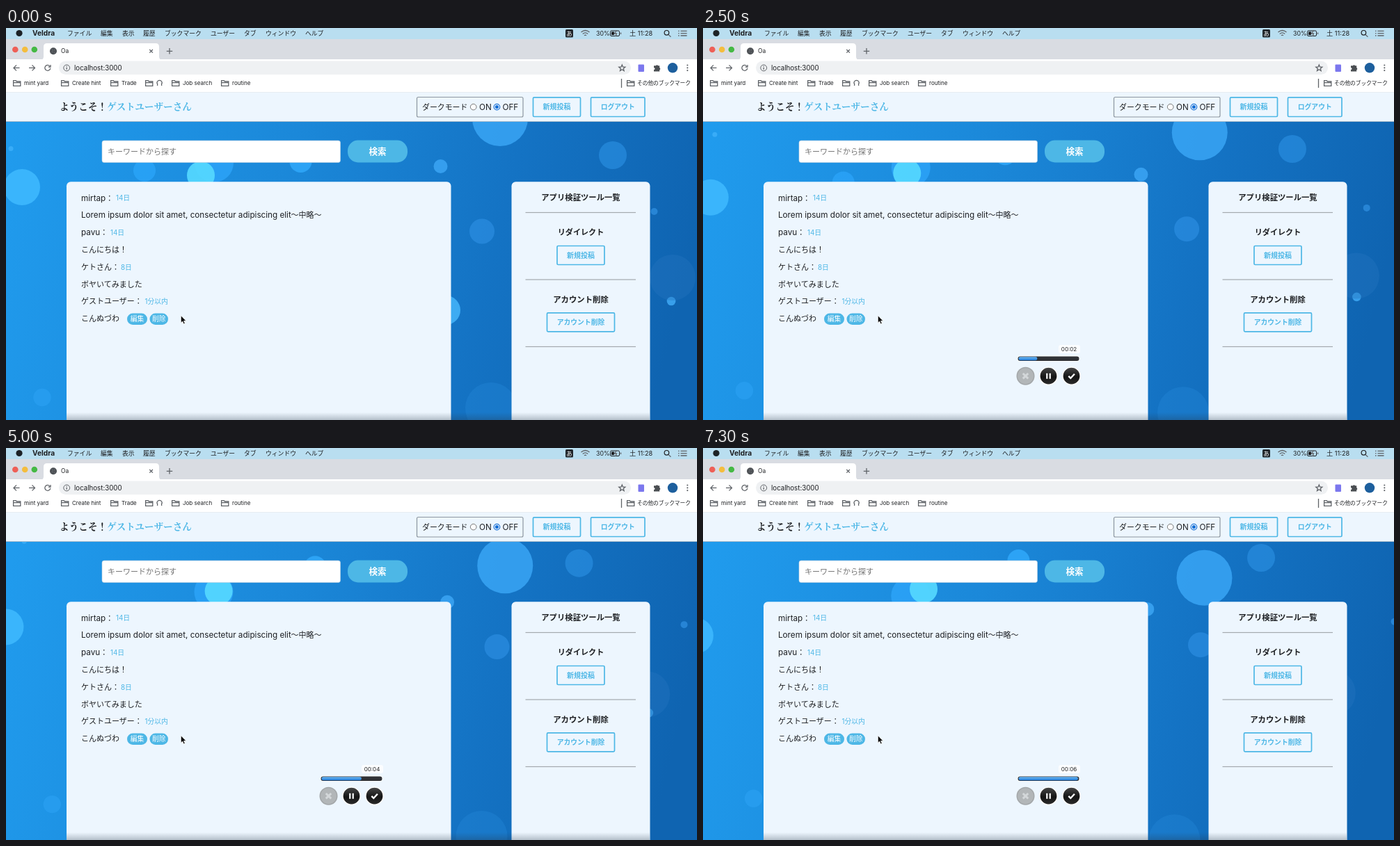
Write an HTML page that moves like this. It is 993 px wide and 564 px high and loops after 7.4 s.

```html
<!DOCTYPE html>
<html lang="ja">
<head>
<meta charset="utf-8">
<title>Oa</title>
<style>
  html, body { margin: 0; width: 100%; height: 100%; overflow: hidden; background: #edf6fe; }
  svg { display: block; font-family: Inter, "Noto Sans CJK JP", "Noto Sans CJK", sans-serif; }
  text { white-space: pre; }
  .mid { text-anchor: middle; }
  .b { font-weight: 700; }
  .serif { font-family: "Noto Serif CJK JP", "Noto Sans CJK JP", "Noto Sans CJK", serif; font-weight: 600; }
  .line { fill: none; stroke: #5f6368; stroke-width: 1.3; }
</style>
</head>
<body>
<svg id="stage" width="993" height="564" viewBox="0 0 993 564">
  <defs>
    <linearGradient id="sea" gradientUnits="userSpaceOnUse" x1="0" y1="190" x2="960" y2="430">
      <stop offset="0" stop-color="#209bed"/>
      <stop offset=".4" stop-color="#1b88d9"/>
      <stop offset=".72" stop-color="#1473c4"/>
      <stop offset="1" stop-color="#0f64b1"/>
    </linearGradient>
    <linearGradient id="foot" x1="0" y1="0" x2="0" y2="1">
      <stop offset="0" stop-color="#234" stop-opacity="0"/>
      <stop offset="1" stop-color="#234" stop-opacity=".28"/>
    </linearGradient>
    <linearGradient id="fill" x1="0" y1="0" x2="0" y2="1">
      <stop offset="0" stop-color="#6cb9f5"/>
      <stop offset="1" stop-color="#1f78d6"/>
    </linearGradient>
    <linearGradient id="knob" x1="0" y1="0" x2="0" y2="1">
      <stop offset="0" stop-color="#484848"/>
      <stop offset=".55" stop-color="#151515"/>
      <stop offset="1" stop-color="#2c2c2c"/>
    </linearGradient>
  </defs>
  <rect y="134" width="993" height="430" fill="url(#sea)"/>
  <g id="bubbles"></g>
  <g id="page"></g>
  <g id="recorder">
    <rect x="511" y="456" width="31" height="12" rx="3" fill="#fff" opacity=".75"/>
    <text id="clock" x="526" y="465" font-size="8" class="mid" fill="#222"></text>
    <rect x="451.5" y="471.5" width="90" height="8.5" rx="4.2" fill="#fff"/>
    <rect x="452.5" y="472.5" width="88" height="6.5" rx="3.2" fill="#303236"/>
    <rect id="progress" x="453.5" y="473.3" height="4.9" rx="2.4" fill="url(#fill)"/>
    <circle cx="463.5" cy="500.7" r="13" fill="#a3a7a9"/>
    <circle cx="463.5" cy="500.7" r="11.5" fill="#b2b6b8"/>
    <path d="M459.8 497l7.4 7.4m0-7.4l-7.4 7.4" stroke="#d3d7d9" stroke-width="3"/>
    <g fill="url(#knob)" stroke="#fff" stroke-width="1.4">
      <circle cx="496.5" cy="500.7" r="12.6"/>
      <circle cx="529.5" cy="500.7" r="12.6"/>
    </g>
    <path d="M494.3 496.7v8m4.4-8v8" stroke="#fff" stroke-width="2.2"/>
    <path d="M525.3 500.8l3 3 5.6-6" fill="none" stroke="#fff" stroke-width="2.4"/>
  </g>
</svg>
<script>
const LOOP = 7400, STEP = 100;
const SKY = "#4db7e6", PALE = "#edf6fe", INK = "#1d1f22";
const byId = id => document.getElementById(id);
const page = byId("page");

function add(parent, tag, attrs, content) {
  const node = document.createElementNS("http://www.w3.org/2000/svg", tag);
  for (const key in attrs) node.setAttribute(key, attrs[key]);
  if (content) node.textContent = content;
  parent.appendChild(node);
  return node;
}
const rect = (x, y, width, height, fill, rx = 0, more) =>
  add(page, "rect", { x, y, width, height, fill, rx, ...more });
const circle = (cx, cy, r, fill, more) => add(page, "circle", { cx, cy, r, fill, ...more });
const path = (d, more) => add(page, "path", { d, class: "line", ...more });
const text = (content, x, y, size, fill = INK, cls = "") =>
  add(page, "text", { x, y, "font-size": size, fill, class: cls }, content);

function outlineButton(label, x, y, w, h, size) {
  rect(x, y, w, h, "none", 1.5, { stroke: SKY, "stroke-width": 1.7 });
  text(label, x + w / 2, y + h / 2 + size * .37, size, SKY, "mid b");
}
function pill(label, x, w) {
  rect(x, 410.5, w, 16.5, SKY, 8.2);
  text(label, x + w / 2, 422.2, 9.8, "#fff", "mid");
}
function folder(x) {
  path(`M${x + .6} 75.6h3.6l1.2 1.4h5.4v6.4h-10.2zM${x + .6} 78.6h10.2`, { "stroke-width": 1 });
}

function drawMenuBar() {
  rect(0, 0, 993, 16, "#b9def0");
  circle(19, 7.5, 4.6, "#1c2226");
  text("Veldra", 38, 11.2, 10.2, INK, "b");
  [["ファイル", 88], ["編集", 136], ["表示", 167], ["履歴", 197], ["ブックマーク", 228], ["ユーザー", 294],
   ["タブ", 342], ["ウィンドウ", 373], ["ヘルプ", 430]].forEach(([label, x]) => text(label, x, 11, 8.8));
  rect(804, 2, 11, 11.5, "#20262b", 1.5);
  text("あ", 809.5, 10.8, 8.4, "#fff", "mid");
  path("M826.5 6q6-5 12 0M828.8 8.4q3.7-3 7.4 0M831 10.7q1.5-1.2 3 0", { stroke: INK });
  text("30%", 848, 11, 8.8);
  rect(868.5, 4, 13, 7.5, "none", 1.5, { stroke: INK });
  rect(870, 5.5, 4, 4.5, INK);
  path("M877.5 3.5l-3 4.5h3l-1.5 4M883.5 6.5v2.5", { stroke: INK });
  text("土 11:28", 896, 11, 9.2);
  path("M952 9.6l3.4 3.2", { stroke: INK });
  circle(949.4, 6.8, 3.3, "none", { stroke: INK, "stroke-width": 1.2 });
  path("M966 4.3h1.5m2 0h9M966 7.7h1.5m2 0h9M966 11h1.5m2 0h9", { stroke: INK });
}

function drawBrowser() {
  rect(0, 16, 993, 30, "#d9dce2");
  [["#ee5f56", 13.3], ["#f4bd3d", 27.2], ["#45b944", 40.8]].forEach(([fill, x]) => circle(x, 31, 4.3, fill));
  path("M49 46q5 0 5-5v-14q0-5 5-5h156q5 0 5 5v14q0 5 5 5z", { style: "fill:#fff;stroke:none" });
  circle(68, 33.2, 5, "#4a4e52");
  path("M65 30.5q3 .5 2.3 3t-2.6.6M70 29.8q-1.6 2 .6 2.8M69 37q-.4-2.4 2.3-2", { stroke: "#fff" });
  text("Oa", 79, 36.2, 8.4);
  path("M206.3 31l4.6 4.6m0-4.6l-4.6 4.6");
  path("M230.8 33.3h8.4m-4.2-4.2v8.4", { stroke: "#333" });

  rect(0, 45, 993, 47, "#fff");
  rect(76, 47.5, 822, 19.5, "#eff1f3", 9.7);
  path("M19.5 57.4h-8.5m4-4l-4 4 4 4");
  path("M33 57.4h8.5m-4-4l4 4-4 4", { stroke: "#b9bcc0" });
  path("M62.8 54.6a4 4 0 1 0 1 3.3M64 53v3h-3");
  circle(87.2, 57.4, 4.4, "none", { stroke: "#5f6368", "stroke-width": 1 });
  path("M87.2 56.8v3m0-5v1", { "stroke-width": 1.1 });
  text("localhost:3000", 98, 60.8, 9.7);
  path("M885.3 53l1.2 3 3.3.2-2.5 2.1.8 3.2-2.8-1.8-2.8 1.8.8-3.2-2.5-2.1 3.3-.2z", { "stroke-width": 1 });
  rect(908.5, 52.5, 8.5, 10.5, "#7c78ee", 1);
  path("M931 54.3h3a1.6 1.6 0 0 1 3 0h2.2v3a1.6 1.6 0 0 1 0 3v2.2H931v-2.6a1.5 1.5 0 0 0 0-3z",
    { style: "fill:#4a4e52;stroke:none" });
  circle(958, 57.3, 7.2, "#1d5f9d");
  [53.5, 57.3, 61.1].forEach(y => circle(979.3, y, 1.1, "#5f6368"));

  [10, 79, 150, 200, 238, 309, 892].forEach(folder);
  [["mint yard", 26], ["Create hint", 95], ["Trade", 166], ["Job search", 254], ["routine", 325]]
    .forEach(([label, x]) => text(label, x, 82.2, 8));
  path("M217 80v-1a3.6 3.6 0 0 1 7.2 0v1");
  path("M217.6 79.5v3.5m6-3.5v3.5", { "stroke-width": 2.4, stroke: INK });
  path("M884.5 73v13", { stroke: "#cfd2d6", "stroke-width": 1 });
  text("その他のブックマーク", 907, 82.2, 7.7);
}

function drawHeader() {
  rect(0, 92, 993, 43, PALE);
  rect(0, 91.5, 993, 1, "#dfe4e8");
  rect(0, 134, 993, 1, "#a9bccb");
  text("ようこそ！", 77, 118.3, 13.65, INK, "serif");
  text("ゲストユーザーさん", 145.3, 118.3, 13.65, SKY, "serif");
  rect(590.5, 99.5, 152.5, 28.5, "none", 2, { stroke: "#8d979f", "stroke-width": 1.2 });
  text("ダークモード", 598, 117.6, 10.9);
  circle(671.7, 113.6, 4.3, "#fff", { stroke: "#777" });
  text("ON", 680, 117.8, 11.7);
  circle(705.4, 113.6, 4.3, "#fff", { stroke: "#1a73d8", "stroke-width": 1.2 });
  circle(705.4, 113.6, 2.6, "#1a73d8");
  text("OFF", 713.5, 117.8, 11.7);
  outlineButton("新規投稿", 757.5, 99.8, 68, 27.7, 10);
  outlineButton("ログアウト", 840.5, 99.8, 77.5, 27.7, 9.8);
}

function drawContent() {
  rect(138, 162, 342.5, 31.5, "#fff", 3, { stroke: "#b9cfdf", "stroke-width": .6 });
  text("キーワードから探す", 146, 181.8, 11, "#757575");
  rect(491, 161.5, 86, 32, SKY, 15);
  text("検索", 534, 182.2, 12.6, "#fff", "mid b");

  rect(87, 221.3, 552.5, 360, PALE, 6);
  const posts = [
    ["mirtap", "：", "14日", 158], ["pavu", "：", "14日", 150],
    ["", "ケトさん：", "8日", 165], ["", "ゲストユーザー：", "1分以内", 199.5]
  ];
  posts.forEach(([latin, kana, age, x], i) => {
    const y = 248.6 + i * 49.6;
    const line = text("", 108, y, 11);
    add(line, "tspan", { "font-size": 11.7 }, latin);
    add(line, "tspan", {}, kana);
    text(age, x, y - .3, 9.8, SKY);
  });
  text("Lorem ipsum dolor sit amet, consectetur adipiscing elit", 108, 273.4, 11.7);
  text("〜中略〜", 409.5, 273.4, 11);
  ["こんにちは！", "ボヤいてみました", "こんぬづわ"].forEach((s, i) => text(s, 108, 323 + i * 49.6, 11));
  pill("編集", 174, 29);
  pill("削除", 206.5, 26.5);
  path("M251.3 413.7v10.6l2.4-2.2 1.7 3.8 1.9-.8-1.7-3.7h3.3z",
    { style: "fill:#000;stroke:#fff;stroke-width:.8" });

  rect(726.5, 221.3, 199, 360, PALE, 6);
  [["アプリ検証ツール一覧", 247.6, 11.35], ["リダイレクト", 298.4, 11.1], ["アカウント削除", 394.7, 11.4]]
    .forEach(([label, y, size]) => text(label, 826, y, size, INK, "mid b"));
  [265.5, 362, 458.5].forEach(y => rect(746.5, y - .6, 158.5, 1.2, "#a3a9ae"));
  outlineButton("新規投稿", 792, 313.5, 68, 27, 10);
  outlineButton("アカウント削除", 777.5, 409.8, 97, 27, 9.8);
  rect(87, 553, 838, 11, "url(#foot)");
}

// x, y, radius, speed x, speed y (px/s), colour, opacity
const bubbles = [
  [23, 229, 26, -4.55, 5.48, "#3fbaff", .85],
  [710, 130, 40, 1.4, 7.6, "#39a5f5", .85],
  [872, 183, 20, -9.35, -3.35, "#2a8fe2", .65],
  [7, 173.5, 3.5, 3.7, -7.6, "#3fb0fa", .8],
  [199, 205, 16, 1, 6.5, "#2ba5fa", .75],
  [299, 194, 28, -.1, 2.5, "#2ea6fb", .75],
  [280, 212, 20, 4.95, -1.2, "#55d8ff", .92],
  [423.5, 192, 16, 4, -4, "#2fa9fb", .85],
  [624.5, 199, 10, 1.85, 4.4, "#3da7f6", .8],
  [684, 292.5, 18, 4.15, -1.25, "#2b8ee2", .7],
  [931.5, 264, 5, 8.3, -1.9, "#2f8fe0", .75],
  [956, 393, 6.3, -6.2, -2.3, "#3fa9f5", .85],
  [958, 359, 33, -7.1, -.9, "#2474be", .4],
  [632, 406, 21, -7.8, -3.6, "#45b5fb", .85],
  [697, 547, 37, -2.6, 2.3, "#2181d3", .5],
  [52, 531.5, 12.7, 2.75, -3.65, "#2ba2f3", .6]
].map(([x, y, r, vx, vy, fill, opacity]) =>
  ({ x, y, vx, vy, node: add(byId("bubbles"), "circle", { r, fill, opacity }) }));

drawContent();
drawHeader();
drawBrowser();
drawMenuBar();

function render(t) {
  const drift = t + .18 * Math.min(t / 1.1, 1);
  for (const { x, y, vx, vy, node } of bubbles) {
    node.setAttribute("cx", x + vx * drift);
    node.setAttribute("cy", y + vy * drift);
  }
  byId("recorder").setAttribute("visibility", t < .15 ? "hidden" : "visible");
  byId("clock").textContent = "00:0" + Math.max(0, Math.floor(t - .45));
  byId("progress").setAttribute("width", Math.max(0, Math.min(86, 12.2 * t - 3.6)));
}

function frame() {
  render(Math.floor(performance.now() % LOOP / STEP) * STEP / 1000);
  requestAnimationFrame(frame);
}
frame();
</script>
</body>
</html>
```
